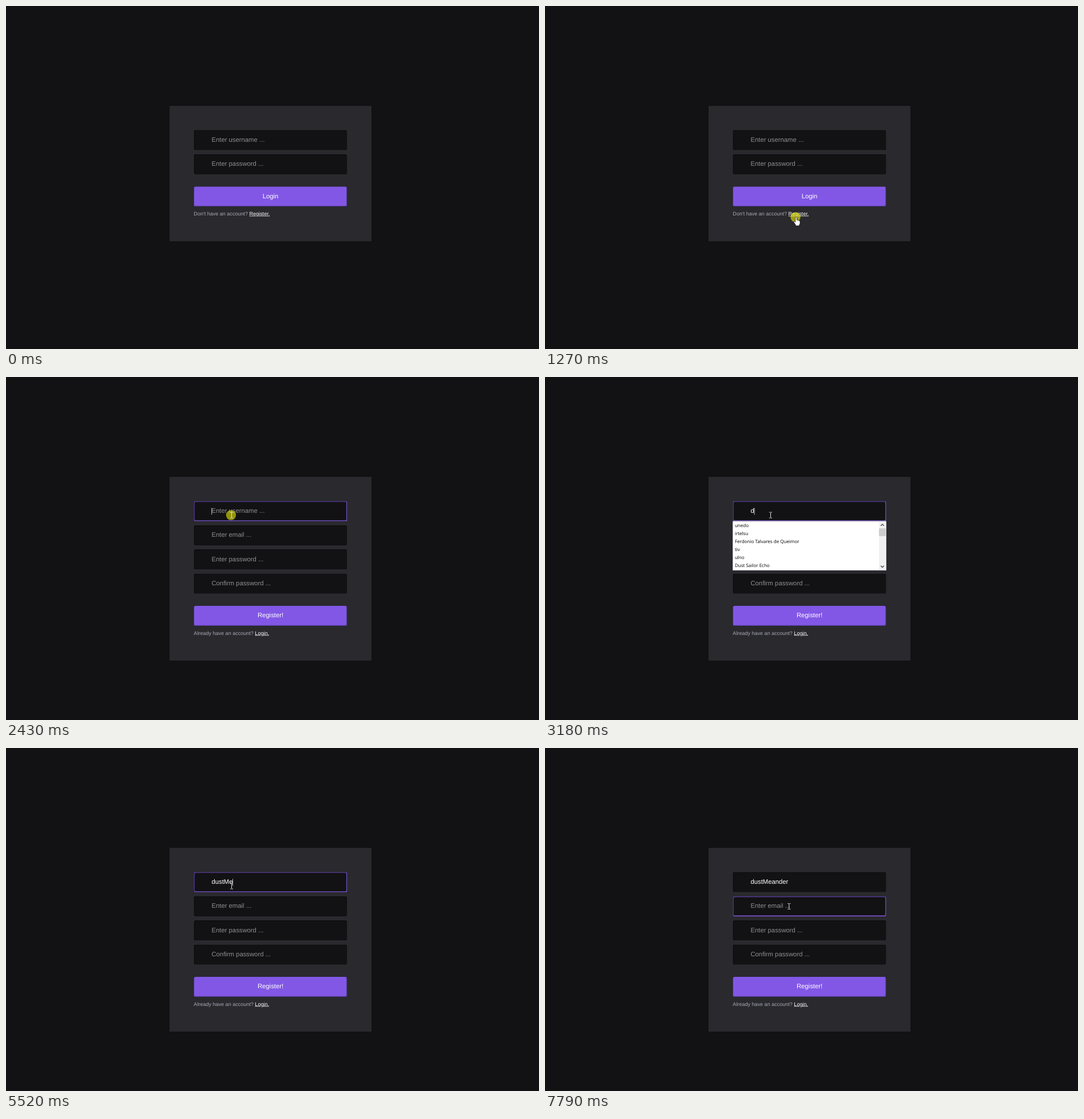
Recreate the animation shown at these times as an HTML page. Size 932 px wide and 601 px high, loop 8 s.

```html
<!DOCTYPE html>
<html lang="en">
<head>
<meta charset="utf-8">
<title>Sign-up form</title>
<style>
  * { box-sizing: border-box; }
  html, body { margin: 0; width: 100%; height: 100%; overflow: hidden; background: #121214; }
  body { position: relative; font: 16px "Liberation Sans", Arial, sans-serif; text-rendering: geometricPrecision; }
  .card {
    position: absolute; left: 0; top: 0; width: 500px; padding: 60px; background: #29292e;
    transform-origin: 0 0; transform: translate(286px, 175px) scale(.706);
  }
  .field {
    display: flex; align-items: center; height: 50px; margin-bottom: 10px; padding-left: 42px;
    color: #fff; background: #121214; border: 2px solid; border-radius: 5px;
    border-color: #0b0b0d #121214 #121214 #0b0b0d; white-space: pre;
  }
  .field.focus { border-color: #5b3da0 #8257e5 #8257e5 #5b3da0; }
  .hint { color: #8f8f92; }
  .caret { width: 1px; height: 17px; margin-right: -1px; background: #fff; }
  .button {
    height: 50px; margin-top: 30px; line-height: 46px; text-align: center; color: #fff;
    background: #8257e5; border: 2px solid; border-radius: 5px;
    border-color: #8257e5 #5b3da0 #5b3da0 #8257e5;
  }
  p { margin: 10px 0 0; font-size: 12.8px; line-height: 16px; color: #a8a8b3; white-space: nowrap; }
  u { color: #fff; }
  .list {
    position: absolute; left: 60px; top: 110px; width: 380px; padding-left: 4px; overflow: hidden;
    background: #fff; border: 1px solid #d0d0d4; color: #000;
    font: 11.4px/20px "Open Sans", "Noto Sans", sans-serif; white-space: nowrap;
  }
  .list svg { position: absolute; right: 0; top: 0; }
  #pointer { position: absolute; left: 0; top: 0; overflow: visible; }
  #pointer path { stroke: #000; stroke-width: .6; fill: #fff; }
  #pointer #beam { stroke: #e2e2e2; stroke-width: 1; fill: none; }
  [hidden] { display: none !important; }
</style>
</head>
<body>
<div class="card" id="login">
  <div class="field"><span class="hint">Enter username ...</span></div>
  <div class="field"><span class="hint">Enter password ...</span></div>
  <div class="button">Login</div>
  <p>Don't have an account? <u>Register.</u></p>
</div>

<div class="card" id="register" hidden>
  <div class="field" id="user"><span id="typed"></span><i class="caret"></i><span class="hint">Enter username ...</span></div>
  <div class="field" id="email"><i class="caret"></i><span class="hint">Enter email ...</span></div>
  <div class="field"><span class="hint">Enter password ...</span></div>
  <div class="field"><span class="hint">Confirm password ...</span></div>
  <div class="button">Register!</div>
  <p>Already have an account? <u>Login.</u></p>
  <div class="list" id="all" hidden>
    <div>unedo</div><div>irtelsu</div><div>Ferdonio Talvares de Queimor</div>
    <div>tiv</div><div>ulno</div><div>Dust Sailor Echo</div>
    <svg width="17" height="120">
      <path fill="#f0f0f0" d="M0 0h17v120H0z"/>
      <path fill="#cdcdcd" d="M0 17h17v19H0z"/>
      <path fill="none" stroke="#505050" stroke-width="2" d="M4.5 10.5l4-4 4 4M4.5 109.5l4 4 4-4"/>
    </svg>
  </div>
  <div class="list" id="match" hidden><div>Dust Sailor Echo</div></div>
</div>

<svg id="pointer" width="1" height="1">
  <circle id="click" cx="-1" r="8.7" fill="#ff0" fill-opacity=".55"/>
  <path id="arrow" d="M0 0V11.7L2.7 9.2 4.5 13.3 6.3 12.5 4.6 8.5H8.3Z"/>
  <path id="hand" d="M-1.2 .3Q0-1.5 1.2 .3V5L5.5 6Q7 6.4 7 8V11L5.7 13.5V15H-.8V13.5L-4 8.5Q-4.3 6.9-2.8 7.2L-1.2 8.8Z"/>
  <path id="beam" d="M-2.5-5H-.6M.6-5H2.5M0-4.5V4.5M-2.5 5H-.6M.6 5H2.5"/>
</svg>

<script>
const LOOP = 8000, BLINK = 530, CLICK = 130, TICK = 67;
const ENTER = 330, HOVER = 1140, SWITCH = 1400, FOCUS = 2430, NEXT = 7260;
const OPEN = 2500, FILTER = 3250, CLOSE = 4590;

const $ = id => document.getElementById(id);
const show = (el, on) => { el.style.display = on ? "" : "none"; el.hidden = !on; };
const clamp = k => Math.min(1, Math.max(0, k));
const easeOut = (k, power) => 1 - (1 - k) ** power;
const smooth = k => k * k * (3 - 2 * k);

// Each burst of typing spreads its letters evenly from start to end.
const burst = (text, start, end) =>
  [...text].map((char, i) => ({ char, time: start + i * (end - start) / Math.max(1, text.length - 1) }));
const keys = [...burst("dust", 3180, 3520), ...burst("M", CLOSE, CLOSE), ...burst("eander", 5520, 6400)];

const clicks = [SWITCH - CLICK, FOCUS, NEXT];

// Progress of a pointer move, sampled at the pointer's own rate.
const progress = (t, start, end) => clamp(Math.floor((t - start) / TICK) * TICK / (end - start));

function position(t) {
  const enter = progress(t, ENTER, 1065);
  const climb = smooth(progress(t, 1540, 2340));
  const last = progress(t, 6670, 7200);
  return [
    849 - 410 * easeOut(enter, 3.6) - 44.5 * climb + 32.3 * last,
    592 - 222 * easeOut(enter, 2.7) - 128 * climb + 35.5 * last + 39 * Math.sin(Math.PI * last)
  ];
}

function shape(t, y) {
  if (t < HOVER) return "arrow";
  if (t < SWITCH) return "hand";
  const betweenFields = (y - 217.4) % 42.4 > 35.3;
  return betweenFields ? "arrow" : "beam";
}

function drawPointer(t) {
  const [x, y] = position(t);
  const current = shape(t, y);
  show($("pointer"), t >= ENTER);
  $("pointer").style.transform = `translate(${x}px, ${y}px)`;
  for (const id of ["arrow", "hand", "beam"]) show($(id), id === current);
  show($("click"), clicks.some(c => t >= c && t < c + CLICK));
}

function drawField(field, focused, caretOn) {
  field.classList.toggle("focus", focused);
  show(field.querySelector(".caret"), focused && caretOn);
}

function draw(t) {
  const typed = keys.filter(k => t >= k.time);
  const inputs = [FOCUS, ...typed.map(k => k.time), NEXT].filter(time => t >= time);
  const caretOn = Math.floor((t - Math.max(...inputs)) / BLINK) % 2 === 0;

  show($("login"), t < SWITCH);
  show($("register"), t >= SWITCH);
  $("typed").textContent = typed.map(k => k.char).join("");
  show($("user").querySelector(".hint"), !typed.length);
  drawField($("user"), t >= FOCUS && t < NEXT, caretOn);
  drawField($("email"), t >= NEXT, caretOn);
  show($("all"), t >= OPEN && t < FILTER);
  show($("match"), t >= FILTER && t < CLOSE);
  drawPointer(t);
}

const begin = performance.now();
function frame() {
  draw((performance.now() - begin) % LOOP);
  requestAnimationFrame(frame);
}
frame();
</script>
</body>
</html>
```
